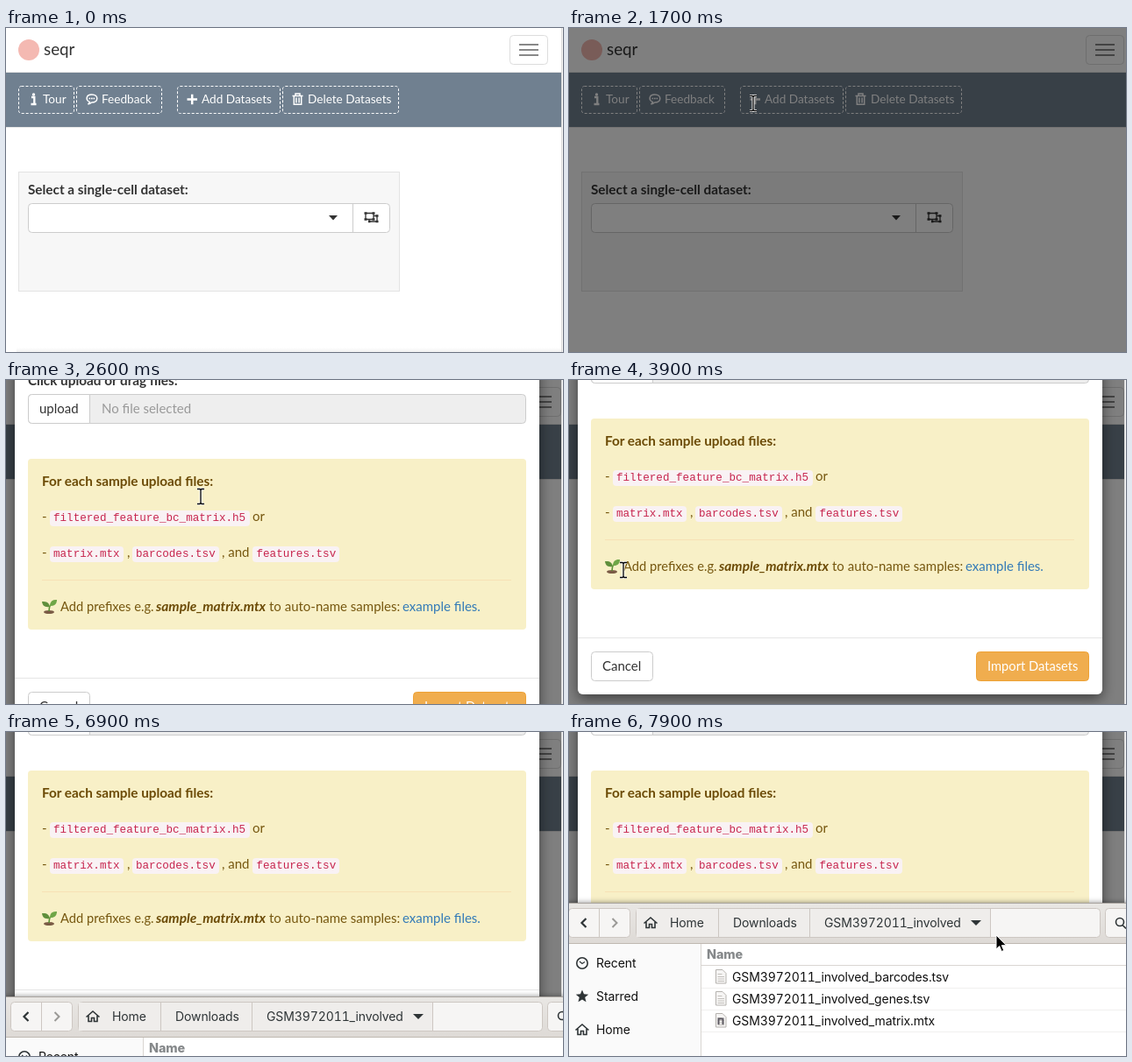
An HTML page that plays this animation: 635x370 px, repeating every 8 s.

```html
<!DOCTYPE html>
<html lang="en">
<head>
<meta charset="utf-8">
<title>Upload single-cell datasets</title>
<style>
  html, body { margin: 0; width: 100%; height: 100%; overflow: hidden; background: #fff; }
  svg { display: block; width: 635px; height: 370px; }
  text { font: 15px Lato, sans-serif; fill: #333; white-space: pre; }
  .bold { font-size: 15.3px; font-weight: 700; }
  .title { font-size: 19.5px; }
  .brand { font-size: 18.8px; }
  .bar text { font-size: 13.6px; fill: #fff; }
  .bar rect { fill: none; stroke: #fff; stroke-dasharray: 3 2; }
  .bar .hover { fill: rgba(255, 255, 255, .12); }
  .icon { fill: none; stroke: #fff; stroke-width: 1.5; }
  .box { fill: #fff; stroke: #ccc; }
  .alert text { fill: #76570f; }
  .alert .bold, .alert .strong { fill: #6b4a05; }
  .alert .code { font: 12.6px "Liberation Mono", monospace; fill: #c7254e; }
  .alert .link { fill: #337ab7; }
  .strong { font-size: 15.5px; font-weight: 700; font-style: italic; }
  #picked text { fill: #fff; }
  .files text { font: 14px Inter, sans-serif; font-variant-numeric: tabular-nums; letter-spacing: -.1px; fill: #111; }
  .files .crumb { fill: #2e3436; }
  .files .head { font-size: 14.4px; font-weight: 800; fill: #85888a; }
  .files .btn { fill: #f6f5f4; stroke: #cdc7c2; }
  .glyph { fill: none; stroke: #2e3436; stroke-width: 1.6; }
</style>
</head>
<body>
<svg viewBox="0 0 635 370">
  <defs>
    <linearGradient id="fade" x2="0" y2="1">
      <stop offset="0" stop-color="#fff"/><stop offset="1" stop-color="#f1f1f1"/>
    </linearGradient>
    <linearGradient id="chrome" x2="0" y2="1">
      <stop offset="0" stop-color="#e9e7e4"/><stop offset="1" stop-color="#dedad6"/>
    </linearGradient>
    <filter id="shadow" x="-10%" y="-10%" width="120%" height="120%">
      <feDropShadow dx="0" dy="5" stdDeviation="7.5" flood-opacity=".5"/>
    </filter>
    <filter id="lift" x="-5%" y="-10%" width="110%" height="120%">
      <feDropShadow dx="0" dy="0" stdDeviation="3" flood-opacity=".45"/>
    </filter>
    <clipPath id="range"><rect id="rangeBox" x="62" y="329" width="0" height="20"/></clipPath>
  </defs>

  <!-- page -->
  <rect width="635" height="370" fill="#fff"/>
  <rect y="50" width="635" height="1" fill="#e7e7e7"/>
  <circle cx="26" cy="25" r="12" fill="#f4b9b2"/>
  <text class="brand" x="43" y="31">seqr</text>
  <g id="menu">
    <rect class="box" x="574.5" y="8.5" width="43" height="33" rx="4" style="stroke:#ddd"/>
    <path d="M585 19h22M585 25h22M585 31h22" stroke="#888" stroke-width="2"/>
  </g>
  <rect y="51" width="635" height="62" fill="#708090"/>
  <rect y="113" width="635" height="1" fill="#e7e7e7"/>
  <g class="bar">
    <rect x="14.5" y="66.5" width="63" height="31" rx="3"/>
    <rect x="80.5" y="66.5" width="97" height="31" rx="3"/>
    <rect id="add" x="195.5" y="66.5" width="117" height="31" rx="3"/>
    <rect x="315.5" y="66.5" width="132" height="31" rx="3"/>
    <path d="M29 79h3.3v7.5M28.5 87h6" class="icon" style="stroke-width:2.3"/>
    <circle cx="31.5" cy="76" r="1.7" fill="#fff"/>
    <path class="icon" d="M93.5 87c1.5-1 2-2 2-2.5c-5-2-4.5-8.5 2.3-8.5c8 0 8 9 0 9c-1.3 1-2.5 1.7-4.300 2z"/>
    <path class="icon" d="M94.5 80.5h1.7M97 80.5h1.7M99.5 80.5h1.7"/>
    <path class="icon" d="M206.5 81.5h11.5M212.2 75.8v11.5" style="stroke-width:2.5"/>
    <path class="icon" d="M326.5 77.5h12M330 77v-2h5v2M328.3 78v9.3h8.4v-9.3M330.9 79.5v6M334.1 79.5v6"/>
    <text x="42" y="86">Tour</text>
    <text x="109" y="86">Feedback</text>
    <text x="223" y="86">Add Datasets</text>
    <text x="344" y="86">Delete Datasets</text>
  </g>
  <rect x="14.5" y="164.5" width="434" height="136" fill="#f7f7f7" stroke="#e3e3e3"/>
  <text class="bold" x="25" y="190">Select a single-cell dataset:</text>
  <rect class="box" x="25.5" y="200.5" width="412" height="33" rx="4"/>
  <path d="M395.5 201v32" stroke="#ccc"/>
  <path d="M368 214h10l-5 5.5z" fill="#333"/>
  <g fill="none" stroke="#333" stroke-width="1.3">
    <path d="M410 211.5h9v7h-9zM419 214.5h4v6.5h-9v-2.5"/>
    <path d="M408.5 211.5h3M417.5 211.5h3M408.5 218.5h3M417.5 218.5h3M421.5 214.5h3M421.5 221h3M413 221h2.5" stroke-width="2.6"/>
  </g>
  <rect id="below" x="12" y="365" width="621" height="5" fill="url(#fade)"/>
  <rect id="dim" width="635" height="370" opacity="0"/>

  <!-- upload dialog -->
  <g id="modal">
    <rect x="10" width="598" height="485" rx="6" fill="#fff" filter="url(#shadow)"/>
    <text class="title" x="25" y="34">Upload Single Cell Datasets</text>
    <path d="M10 55.5h598M10 420.5h598" stroke="#e5e5e5"/>
    <text class="bold" x="25" y="86">Click upload or drag files:</text>
    <rect class="box" x="25.5" y="96.5" width="567" height="33" rx="4" style="fill:#eee"/>
    <path class="box" d="M95.5 96.5h-66a4 4 0 0 0-4 4v25a4 4 0 0 0 4 4h66z"/>
    <text x="38" y="118">upload</text>
    <text x="109" y="118" style="fill:#999">No file selected</text>
    <g class="alert">
      <rect x="25" y="170" width="568" height="195" rx="4" fill="#f8f0c7"/>
      <g fill="#f9f2f4">
        <rect x="50" y="229" width="228" height="18" rx="4"/>
        <rect x="50" y="270" width="84" height="18" rx="4"/>
        <rect x="144" y="270" width="99" height="18" rx="4"/>
        <rect x="281" y="270" width="99" height="18" rx="4"/>
      </g>
      <text class="bold" x="41" y="201">For each sample upload files:</text>
      <text x="41" y="241">-</text>
      <text class="code" x="54" y="241">filtered_feature_bc_matrix.h5</text>
      <text x="281" y="241">or</text>
      <text x="41" y="282">-</text>
      <text class="code" x="54" y="282">matrix.mtx</text>
      <text x="138" y="282">,</text>
      <text class="code" x="148" y="282">barcodes.tsv</text>
      <text x="246" y="282">, and</text>
      <text class="code" x="285.5" y="282">features.tsv</text>
      <path d="M41 308.5h535" stroke="#f7e1b5"/>
      <g transform="translate(0 -4)">
        <ellipse cx="49" cy="349" rx="6" ry="2" fill="#7a5b45"/>
        <path d="M49 348c0-4 .5-5 1.5-7" fill="none" stroke="#5c9136" stroke-width="1.6"/>
        <path d="M49.5 343c-6 1-8-2-8.5-6c5-.5 8.5 1 8.5 6z" fill="#5f8f3c"/>
        <path d="M50 342c0-5 3-7.5 8-7c0 5-3 7.5-8 7z" fill="#6fa647"/>
      </g>
      <g id="hint">
        <text x="62" y="344" style="font-size:14.7px">Add prefixes e.g.</text>
        <text class="strong" x="171" y="344">sample_matrix.mtx</text>
        <text x="300" y="344">to auto-name samples:</text>
      </g>
      <text class="link" x="452" y="344">example files.</text>
      <g id="picked" clip-path="url(#range)">
        <rect x="62" y="329" width="520" height="20" fill="#308cf2"/>
      </g>
    </g>
    <rect class="box" x="25.5" y="436.5" width="70" height="33" rx="4"/>
    <text x="38" y="458">Cancel</text>
    <rect x="464.5" y="436.5" width="128" height="33" rx="4" fill="#f0ad4e" stroke="#eea236"/>
    <text x="477" y="458" style="fill:#fff;font-size:14.7px">Import Datasets</text>
  </g>
  <g id="edge">
    <rect x="633" width="2" height="370" fill="#f2f2f2"/>
    <rect x="633" width="1" height="370" fill="#dcdcdc"/>
  </g>

  <!-- file chooser -->
  <g id="files" class="files">
    <rect x="-20" y="195" width="700" height="300" fill="#fff" filter="url(#lift)"/>
    <rect x="-20" y="195" width="700" height="46" fill="url(#chrome)"/>
    <path d="M-20 195.5h700" stroke="#aaa5a0"/>
    <path d="M-20 241.5h700" stroke="#bfb8b1"/>
    <rect class="btn" x="-.5" y="201.5" width="70" height="33" rx="4"/>
    <path d="M34.5 202v32" stroke="#cdc7c2"/>
    <rect class="btn" x="76.5" y="201.5" width="529" height="33" rx="4"/>
    <path d="M77 202h404v32h-404z" fill="#efedeb"/>
    <path d="M170.5 202v32M274.5 202v32M480.5 202v32" stroke="#cdc7c2"/>
    <rect class="btn" x="611.5" y="201.5" width="50" height="33" rx="4"/>
    <path class="glyph" d="M19.500 213l-5 5l5 5" style="stroke-width:2.2"/>
    <path class="glyph" d="M49.5 213l5 5l-5 5" style="stroke:#9a9996;stroke-width:2"/>
    <path id="house" class="glyph" d="M85.5 218.5l7.5-6.5l7.5 6.5M88 217v6.5h3.5v-4h3v4h3.5v-6.5"/>
    <path d="M458 215h12l-6 6z" fill="#2e3436"/>
    <circle class="glyph" cx="628" cy="217" r="4.5"/>
    <path class="glyph" d="M631 220.5l4 4"/>
    <text class="crumb" x="115" y="223">Home</text>
    <text class="crumb" x="187" y="223">Downloads</text>
    <text class="crumb" x="291" y="223">GSM3972011_involved</text>
    <rect x="-20" y="242" width="170" height="250" fill="#fafafa"/>
    <path d="M150.5 242v250M151 266.5h500" stroke="#d9d6d2"/>
    <path d="M151 292.5h500M151 317.5h500M151 342.5h500" stroke="#f1f0ef"/>
    <text class="head" x="157" y="259">Name</text>
    <circle class="glyph" cx="15" cy="264" r="6.2"/>
    <path class="glyph" d="M12 262l3 2.5l3-2" style="stroke-width:1.2"/>
    <path d="M15 294.5l2 4.700l5.2.5l-4 3.4l1.3 5.2l-4.5-2.8l-4.5 2.8l1.3-5.2l-4-3.4l5.2-.5z" fill="#2e3436"/>
    <use href="#house" x="-78" y="122"/>
    <text x="31" y="269">Recent</text>
    <text x="31" y="307">Starred</text>
    <text x="31" y="345">Home</text>
    <g id="page">
      <path d="M167.5 271.5h7.5l4 4v11.5h-11.5z" fill="#f6f5f4" stroke="#b5b2ae"/>
      <path d="M169.5 276.5h5M169.5 279.5h7.5M169.5 282h7.5M169.5 284.5h7.5" stroke="#c4c1bd"/>
    </g>
    <use href="#page" y="25"/>
    <use href="#page" y="50"/>
    <path d="M170.5 334v-6.5h5v6.5" fill="none" stroke="#5e5c64" stroke-width="2"/>
    <text x="186" y="285">GSM3972011_involved_barcodes.tsv</text>
    <text x="186" y="310">GSM3972011_involved_genes.tsv</text>
    <text x="186" y="335">GSM3972011_involved_matrix.mtx</text>
  </g>

  <path id="arrow" d="M0 0v16l3.7-3.4l2.5 5.9l2.6-1.1l-2.5-5.7h5.2z" fill="#000" stroke="#fff"/>
  <g id="beam" fill="none">
    <path d="M-4-8.5h3l1 1l1-1h3M0-8v16M-4 8.5h3l1-1l1 1h3" stroke="#fff" stroke-width="3"/>
    <path d="M-4-8.5h3l1 1l1-1h3M0-8v16M-4 8.5h3l1-1l1 1h3" stroke="#000" stroke-width="1.3"/>
  </g>
</svg>
<script>
  const LOOP = 8000, STEP = 100;
  const el = id => document.getElementById(id);

  // Each row: time, then values
  const pointer = [
    [100, 102, -8], [500, 150, 32], [800, 200, 70], [1000, 207, 80], [1500, 210, 86],
    [2300, 210, 86], [2700, 226, 149], [3200, 130, 200], [3600, 70, 217], [3800, 62, 217],
    [3900, 62, 217], [4300, 340, 216], [4500, 289, 216], [5400, 445, 215], [5500, 447, 215],
    [5600, 450, 216], [5900, 560, 250], [6200, 571, 285], [7500, 489, 245], [7900, 487, 232]
  ];
  const shapes = [[0, ''], [100, 'arrow'], [1500, 'beam'], [1800, 'arrow'], [2600, 'beam'],
    [5700, 'arrow'], [6400, ''], [7500, 'arrow']];
  const modalTop = [[1800, -100, .5], [1900, -60, 1], [2000, -28, 1], [2100, -8, 1], [2200, 3, 1],
    [2300, 10, 1], [2400, 10, 1], [2500, -20, 1], [2600, -80, 1], [2700, -126, 1]];
  const filesAt = [[6400, 6, 158], [6900, 6, 107], [7200, 3, 30], [7500, 0, 6], [7800, 0, 0]];
  const dimming = [[1400, 0], [1700, .5]];

  function at(keys, t) {
    const n = keys.findIndex(k => k[0] > t);
    if (n === 0) return keys[0].slice(1);
    if (n < 0) return keys[keys.length - 1].slice(1);
    const a = keys[n - 1], b = keys[n], p = (t - a[0]) / (b[0] - a[0]);
    return a.slice(1).map((v, i) => v + (b[i + 1] - v) * p);
  }
  const within = (t, from, to) => t >= from && t < to;
  const show = (id, on) => { el(id).style.display = on ? '' : 'none'; };
  const move = (id, x, y) => el(id).setAttribute('transform', `translate(${Math.round(x)} ${Math.round(y)})`);

  function draw(t) {
    const [x, y] = at(pointer, t);
    const shape = shapes.filter(s => s[0] <= t).pop()[1];
    for (const id of ['arrow', 'beam']) {
      show(id, id === shape);
      move(id, x, y);
    }
    el('add').classList.toggle('hover', within(t, 800, 1400));

    const open = t >= 1400;
    move('menu', open ? 15 : 0, 0);
    show('below', !open);
    show('edge', !within(t, 1400, 2000));
    el('dim').setAttribute('opacity', at(dimming, t)[0]);

    const [top, alpha] = at(modalTop, t);
    show('modal', t >= 1800);
    move('modal', 0, top);
    el('modal').setAttribute('opacity', alpha);

    const picking = within(t, 3900, 5700);
    el('rangeBox').setAttribute('width', picking ? Math.max(0, x - 62) : 0);

    show('files', t >= 6400);
    move('files', ...at(filesAt, t));
  }

  // White copy of the hint, revealed by the selection
  for (const line of el('hint').children) {
    const copy = line.cloneNode(true);
    el('picked').append(copy);
  }

  const start = performance.now();
  function tick() {
    const t = (performance.now() - start) % LOOP;
    draw(Math.floor(t / STEP) * STEP);
    requestAnimationFrame(tick);
  }
  tick();
</script>
</body>
</html>
```
